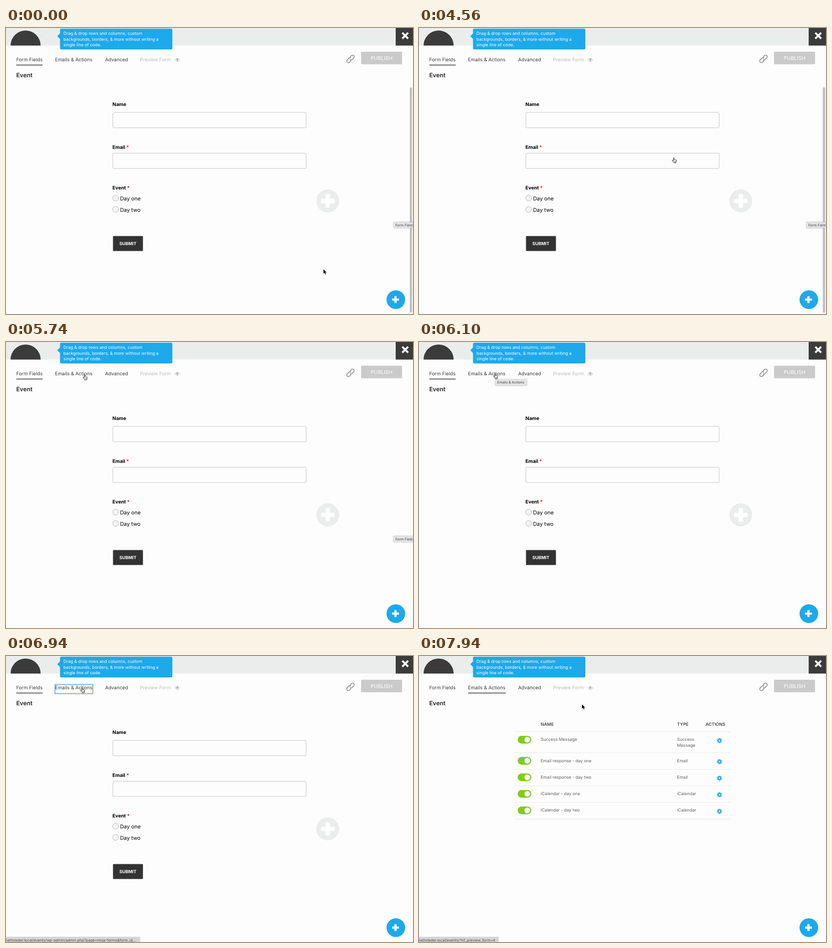
Write an HTML page that moves like this. It is 893 by 627 pixels and loops after 8000 ms.

```html
<!DOCTYPE html>
<html lang="en">
<head>
<meta charset="utf-8">
<title>Form builder</title>
<style>
html, body { margin: 0; width: 100%; height: 100%; overflow: hidden; background: #fdfdfd; }
svg { display: block; width: 893px; height: 627px; }
text { font-family: Inter, sans-serif; text-rendering: geometricPrecision; white-space: pre; }

.nav { font-size: 10.5px; fill: #3a3a3a; }
.title { font-size: 13px; font-weight: 600; fill: #222; }
.hint { font-size: 9.3px; fill: #fff; }
.label { font-size: 10.6px; font-weight: 700; fill: #000; }
.req { fill: #f00; }
.choice { font-size: 11.65px; fill: #000; }
.submit { font-size: 9.5px; font-weight: 700; fill: #fff; }
.publish { font-size: 11.2px; fill: #fff; }
.head { font-size: 9.5px; font-weight: 600; fill: #444; }
.cell { font-size: 9.3px; fill: #606060; }
.tip { font-size: 7.6px; fill: #444; }
.status { font-size: 8.12px; fill: #4c4c4c; }
.box { fill: #fdfdfd; stroke: #c3c3c3; }
.tipbox { fill: #e5e4e5; filter: drop-shadow(0 .6px 1px rgba(0, 0, 0, .4)); }
.focus { fill: none; stroke: #5b9dd9; filter: drop-shadow(0 0 1px rgba(30, 140, 190, .8)); }

/* 8 s loop; 1 % = 80 ms, held between changes */
.anim { animation: 8s step-end -1ms infinite; }
#form { animation-name: form; }
#table, #lineB { animation-name: table; }
#lineA { animation-name: form; }
#bar { animation-name: bar; }
#tipA { animation-name: tipA; }
#tipB { animation-name: tipB; }
#urlA { animation-name: urlA; }
#urlB { animation-name: urlB; }
#focus { animation-name: focus; }
#cursor { animation-name: move; }
#arrow { animation-name: arrow; }
#hand { animation-name: hand; }

@keyframes form { 0% { opacity: 1 } 88.875% { opacity: 0 } }
@keyframes table { 0% { opacity: 0 } 88.875% { opacity: 1 } }
@keyframes bar {
  0% { opacity: 1 } 64.375% { opacity: .75 } 65.875% { opacity: .5 }
  67.375% { opacity: .25 } 68.875% { opacity: 0 }
}
@keyframes tipA { 0% { opacity: 1 } 73.25% { opacity: 0 } }
@keyframes tipB { 0% { opacity: 0 } 76.25% { opacity: 1 } 86.75% { opacity: 0 } }
@keyframes urlA { 0% { opacity: 0 } 79.25% { opacity: .92 } 80.75% { opacity: 1 } 97.75% { opacity: 0 } }
@keyframes urlB { 0% { opacity: 0 } 97.75% { opacity: 1 } }
@keyframes focus { 0% { opacity: 0 } 86.75% { opacity: 1 } 88.875% { opacity: 0 } }
@keyframes arrow {
  0% { opacity: 1 } 57% { opacity: 0 } 63% { opacity: 1 }
  68.875% { opacity: 0 } 99.25% { opacity: 1 }
}
@keyframes hand {
  0% { opacity: 0 } 57% { opacity: 1 } 63% { opacity: 0 }
  68.875% { opacity: 1 } 99.25% { opacity: 0 }
}
@keyframes move {
  0% { transform: translate(696.6px, 529px) }
  1.5% { transform: translate(696px, 528.2px) }
  16.5% { transform: translate(694px, 527.2px) }
  18% { transform: translate(690px, 525px) }
  19.5% { transform: translate(687.6px, 523.8px) }
  57% { transform: translate(555px, 284px) }
  58.5% { transform: translate(430px, 222px) }
  60% { transform: translate(345px, 175px) }
  61.5% { transform: translate(290px, 145px) }
  63% { transform: translate(254px, 124px) }
  64.375% { transform: translate(232px, 111px) }
  65.875% { transform: translate(220px, 104px) }
  67.375% { transform: translate(204px, 93px) }
  68.875% { transform: translate(185px, 81px) }
  70.25% { transform: translate(174px, 74.5px) }
  71.75% { transform: translate(168.5px, 71.5px) }
  73.25% { transform: translate(165px, 70px) }
  74.75% { transform: translate(163px, 69px) }
  96.375% { transform: translate(220px, 69px) }
  97.75% { transform: translate(312px, 75px) }
  99.25% { transform: translate(357.6px, 106px) }
}
</style>
</head>
<body>
<svg viewBox="0 0 893 627">
  <defs>
    <g id="toggle">
      <rect x="216.5" y="-8.5" width="30" height="17" rx="8.5" fill="#80cc1c"/>
      <circle cx="237.6" r="6.2" fill="#fff"/>
    </g>
    <g id="gear" fill="none" stroke="#1ea9ea">
      <circle r="3.1" stroke-width="2.6"/>
      <circle r="4.9" stroke-width="1.7" stroke-dasharray="1.95 1.9" stroke-dashoffset=".97"/>
    </g>
    <path id="rule" d="M208 0H684" stroke="#e9e9e9"/>
    <circle id="radio" cx="240.4" r="6.4" fill="#f3f3f3" stroke="#b4b4b4"/>
  </defs>

  <rect width="893" height="627" fill="#fdfdfd"/>

  <!-- header -->
  <rect width="893" height="38.5" fill="#ebedec"/>
  <path d="M10 38.5a33 33 0 0 1 66 0z" fill="#3b3b3b"/>
  <rect x="855" width="38" height="38.5" fill="#3b3b3b"/>
  <path d="M871 11.800l9.800 9.800M880.800 11.800l-9.800 9.800" stroke="#fff" stroke-width="4.200" stroke-linecap="square" transform="translate(0 .2)"/>
  <rect x="118.500" y="1.500" width="246.500" height="45.500" rx="3" fill="#1ea9ea"/>
  <path d="M119 11.500v13l-6.500-6.500z" fill="#1ea9ea"/>
  <g class="hint">
    <text x="126" y="15.300">Drag &amp; drop rows and columns, custom</text>
    <text x="126" y="27.700">backgrounds, borders, &amp; more without writing a</text>
    <text x="126" y="40.100">single line of code.</text>
  </g>

  <!-- navigation -->
  <g class="nav">
    <text x="22.500" y="73.300">Form Fields</text>
    <text x="107.600" y="73.300">Emails &amp; Actions</text>
    <text x="217.500" y="73.300">Advanced</text>
    <text x="294" y="73.300" fill="#bbb" style="fill:#bbb">Preview Form</text>
  </g>
  <rect id="lineA" class="anim" x="22.500" y="80.500" width="58" height="1.500" fill="#333"/>
  <rect id="lineB" class="anim" x="107.700" y="80.500" width="82.500" height="1.500" fill="#333"/>
  <rect id="focus" class="anim focus" x="107.500" y="62.500" width="83" height="20"/>
  <g fill="none" stroke="#b5b5b5">
    <path d="M370.300 70q5.500-7.400 11 0q-5.500 7.400-11 0z"/>
    <circle cx="375.800" cy="69.600" r="2" fill="#b5b5b5"/>
  </g>
  <g transform="translate(755.800 67.700) rotate(-45)" fill="none" stroke="#999" stroke-width="2">
    <path d="M-1.500 2.200A3.600 3.600 0 0 1-5 3.600H-6.500a3.600 3.600 0 0 1 0-7.200H-2a3.600 3.600 0 0 1 3.500 3.400"/>
    <path d="M1.500-2.200A3.600 3.600 0 0 1 5-3.600H6.500a3.600 3.600 0 0 1 0 7.200H2a3.600 3.600 0 0 1-3.500-3.400"/>
  </g>
  <rect x="779" y="52" width="90" height="27.500" rx="2" fill="#c9cac9"/>
  <text class="publish" x="824" y="70" text-anchor="middle">PUBLISH</text>
  <text class="title" x="22.500" y="107.600">Event</text>

  <!-- form fields -->
  <g id="form" class="anim">
    <g class="label">
      <text x="233.600" y="171">Name</text>
      <text x="233.600" y="265">Email <tspan class="req">*</tspan></text>
      <text x="233.600" y="354.400">Event <tspan class="req">*</tspan></text>
    </g>
    <rect class="box" x="234.500" y="185" width="424" height="33.800" rx="2"/>
    <rect class="box" x="234.500" y="274.500" width="424" height="33.500" rx="2"/>
    <use href="#radio" y="373"/>
    <use href="#radio" y="397.800"/>
    <text class="choice" x="250.200" y="377.800">Day one</text>
    <text class="choice" x="250.200" y="402.700">Day two</text>
    <rect x="235" y="456.300" width="65.200" height="32.400" rx="1" fill="#333" stroke="#555" stroke-width=".7"/>
    <text class="submit" x="267.400" y="475.800" text-anchor="middle">SUBMIT</text>
    <circle cx="706" cy="379" r="25.200" fill="#ebedec"/>
    <g fill="#fff">
      <rect x="691" y="374.400" width="30" height="9.400" rx="2"/>
      <rect x="701.300" y="364" width="9.400" height="30" rx="2"/>
    </g>
  </g>

  <!-- actions list -->
  <g id="table" class="anim">
    <g class="head">
      <text x="267" y="152.600">NAME</text>
      <text x="566.300" y="152.600">TYPE</text>
      <text x="628.700" y="152.600">ACTIONS</text>
    </g>
    <use href="#rule" y="166"/>
    <use href="#rule" y="212"/>
    <use href="#rule" y="248.500"/>
    <use href="#rule" y="284.600"/>
    <use href="#rule" y="321"/>
    <use href="#rule" y="357.200"/>
    <g transform="translate(0 183.500)">
      <use href="#toggle"/>
      <text class="cell" x="267" y="2.800">Success Message</text>
      <text class="cell" x="566.300" y="2.800">Success</text>
      <text class="cell" x="566.300" y="15.300">Message</text>
      <use href="#gear" x="659.300" y="1.900"/>
    </g>
    <g transform="translate(0 229.700)">
      <use href="#toggle"/>
      <text class="cell" x="267" y="2.800">Email response - day one</text>
      <text class="cell" x="566.300" y="2.800">Email</text>
      <use href="#gear" x="659.300" y="1.900"/>
    </g>
    <g transform="translate(0 266)">
      <use href="#toggle"/>
      <text class="cell" x="267" y="2.800">Email response - day two</text>
      <text class="cell" x="566.300" y="2.800">Email</text>
      <use href="#gear" x="659.300" y="1.900"/>
    </g>
    <g transform="translate(0 302.200)">
      <use href="#toggle"/>
      <text class="cell" x="267" y="2.800">iCalendar - day one</text>
      <text class="cell" x="566.300" y="2.800">iCalendar</text>
      <use href="#gear" x="659.300" y="1.900"/>
    </g>
    <g transform="translate(0 338.500)">
      <use href="#toggle"/>
      <text class="cell" x="267" y="2.800">iCalendar - day two</text>
      <text class="cell" x="566.300" y="2.800">iCalendar</text>
      <use href="#gear" x="659.300" y="1.900"/>
    </g>
  </g>

  <!-- add button and scrollbar -->
  <circle cx="855.400" cy="595.500" r="20.500" fill="#1ea9ea"/>
  <g fill="#fff">
    <rect x="847" y="593" width="15.200" height="4.800" rx="1"/>
    <rect x="852.200" y="587.800" width="4.800" height="15.200" rx="1"/>
  </g>
  <rect id="bar" class="anim" x="886" y="130" width="5.200" height="494" rx="2.600" fill="#c1c1c1"/>

  <!-- tooltips and status line -->
  <g id="tipA" class="anim">
    <rect class="tipbox" x="850" y="425.500" width="50" height="13" rx="1"/>
    <text class="tip" x="854.200" y="434.700">Form Field</text>
  </g>
  <g id="tipB" class="anim">
    <rect class="tipbox" x="167.500" y="82" width="69" height="13.500" rx="1"/>
    <text class="tip" x="171.500" y="91.300">Emails &amp; Actions</text>
  </g>
  <g id="urlA" class="anim">
    <path d="M0 615.500H292a2.500 2.500 0 0 1 2.500 2.500V627H0z" fill="#d5d5d6"/>
    <text class="status" x="-1" y="625.500">nettsteder.local/events/wp-admin/admin.php?page=ninja-forms&amp;form_id...</text>
  </g>
  <g id="urlB" class="anim">
    <path d="M0 615.500H172.500a2.500 2.500 0 0 1 2.500 2.500V627H0z" fill="#d5d5d6"/>
    <text class="status" x="-1" y="625.500">nettsteder.local/events/?nf_preview_form=4</text>
  </g>

  <g id="cursor" class="anim">
    <path id="arrow" class="anim" d="M0 0V9.600L2.200 7.600 3.800 11.200 5.400 10.500 3.800 7H6.800z" fill="#000" stroke="#fff" stroke-width=".8" paint-order="stroke"/>
    <g id="hand" class="anim" stroke="#000" stroke-linejoin="round">
      <path d="M3 7.300V1.400a.9.900 0 0 1 1.800 0V4.600c.3-.8 1.500-.7 1.700.1.400-.6 1.400-.5 1.600.3.500-.4 1.400 0 1.400.8V8q0 1.200-.8 2.200V11.500H4.100V10.800L.8 7.200q-.5-1 .5-1.200.6 0 1.700 1.300z" fill="#fff" stroke-width=".9"/>
      <path d="M4.900 7.600v2M6.300 7.600v2M7.700 7.600v2" fill="none" stroke-width=".6"/>
    </g>
  </g>
</svg>
</body>
</html>
```
